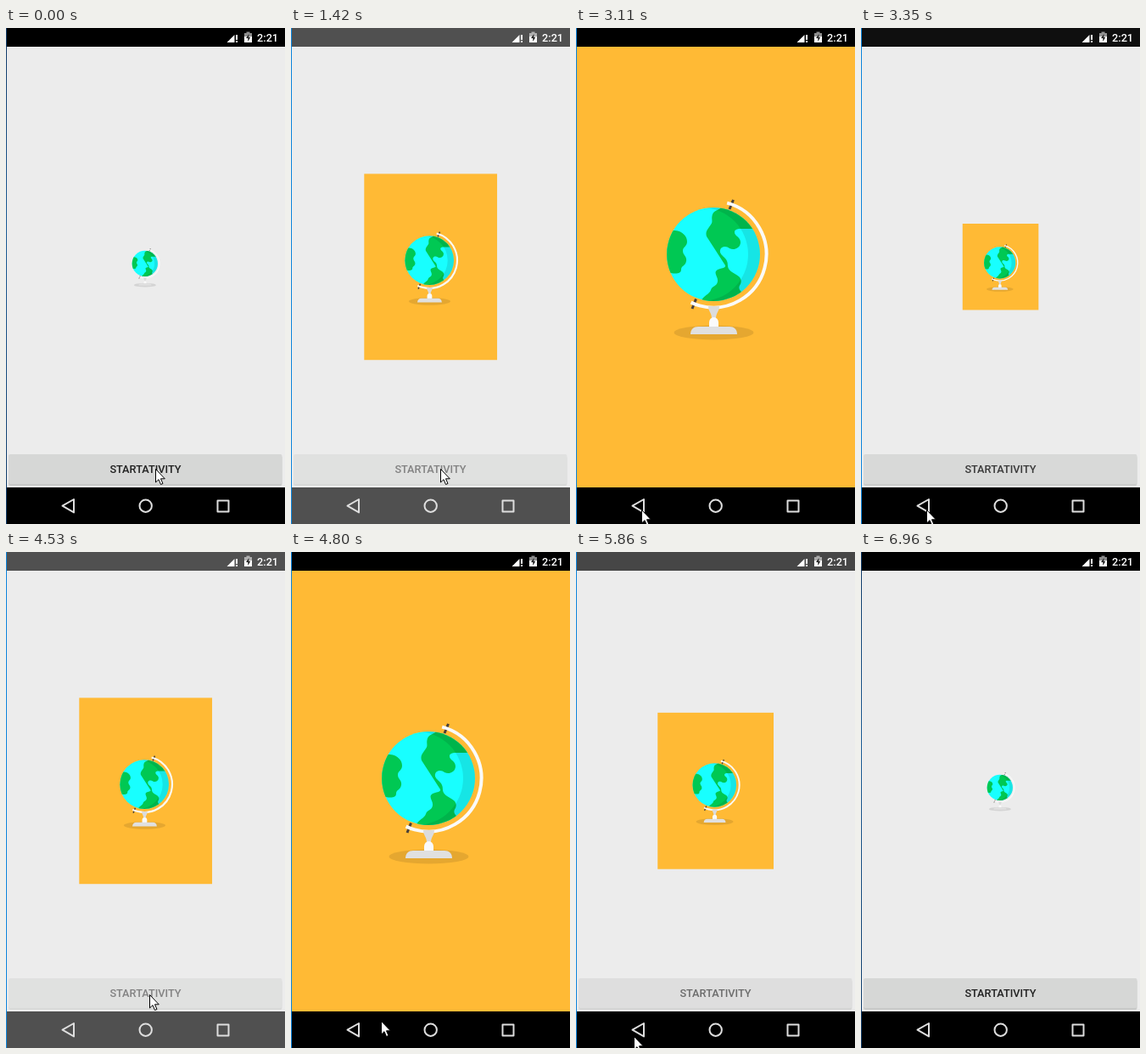
Write an HTML page that moves like this. It is 329 px wide and 583 px high and loops after 7.06 s.

```html
<!DOCTYPE html>
<html lang="en">
<head>
<meta charset="utf-8">
<title>Shared element transition</title>
<style>
  html, body { margin: 0; width: 100%; height: 100%; overflow: hidden; background: #000; }
  svg { display: block; width: 329px; height: 583px; }
  text { font-family: Roboto, sans-serif; font-weight: 500; font-size: 12.75px; }
</style>
</head>
<body>
<svg viewBox="0 0 329 583">
  <defs>
    <linearGradient id="dim" x2="0" y2="1">
      <stop offset="0" stop-color="#123a66"/>
      <stop offset=".4" stop-color="#1b5c96"/>
      <stop offset="1" stop-color="#123a66"/>
    </linearGradient>
    <clipPath id="content"><rect x="1" y="22" width="328" height="518"/></clipPath>
    <clipPath id="navClip"><rect x="1" y="540" width="328" height="43"/></clipPath>
    <clipPath id="ball"><circle cx="162" cy="266" r="55"/></clipPath>
  </defs>

  <rect width="329" height="583"/>
  <rect x="1" y="22" width="328" height="518" fill="#ececec"/>

  <g id="button">
    <rect x="3" y="503" width="322.500" height="35" rx="2" fill="#c9cac9"/>
    <rect x="3" y="501" width="322.500" height="35" rx="2" fill="#d6d7d6"/>
    <rect id="press" x="3" y="501" width="322.500" height="35" rx="2"/>
    <text x="164.500" y="523" text-anchor="middle" fill="#222">STARTATIVITY</text>
  </g>

  <g clip-path="url(#content)">
    <rect id="card" fill="#ffba35"/>
    <g id="globe">
      <ellipse cx="162.500" cy="358" rx="47" ry="8.500" opacity=".1"/>
      <path d="M185.500 202 181 213M141.500 318.500 137 330" stroke="#4a4038" stroke-width="3"/>
      <circle cx="162" cy="266" r="55" fill="#18ffff"/>
      <g clip-path="url(#ball)">
        <g fill="#00c853">
          <path d="M100 238H117C126 239 131 245 131 251C131 257 126 257 126 262C126 267 131 268 130 274C129 280 124 279 124 284C124 289 118 289 112 288H100Z"/>
          <path d="M172 208C171 215 163 213 161 219C159 225 162 227 159 231C156 236 152 239 154 245L176 279C177 282 171 282 167 284C161 288 168 292 167 298C166 304 160 303 159 308C157 314 147 315 147 325H198V312C192 309 191 305 194 301C198 290 184 290 180 283C178 279 180 277 177 272C174 268 169 266 170 261C171 256 178 256 181 259C187 262 194 258 194 252C194 245 187 245 187 240C187 237 190 236 194 236H220V205Z"/>
        </g>
        <path d="M148 211A55 55 0 0 1 148 321H230V211Z" opacity=".1"/>
      </g>
      <circle cx="162" cy="266" r="62.500" fill="none" stroke="#fafafa" stroke-width="4"
        pathLength="360" stroke-dasharray="190 170" transform="rotate(-75 162 266)"/>
      <path d="M156 327H169C169 333 165 335 165 341H160C160 335 156 333 156 327Z" fill="#dcdcdc"/>
      <path d="M157 352V346A5.500 6 0 0 1 168 346V352Z" fill="#fafafa"/>
      <path d="M135 360C135 354 139 351 144 351H181C186 351 190 354 190 360Z" fill="#e0e0e0"/>
    </g>
  </g>

  <rect id="statusVeil" x="1" width="328" height="22" fill="#eee"/>
  <rect id="navVeil" x="1" y="540" width="328" height="43" fill="#eee"/>
  <circle id="ripple" cx="73" cy="562" fill="#fff" clip-path="url(#navClip)"/>

  <g fill="#fff">
    <path d="M260.500 17H269.500V8Z"/>
    <path d="M271 8H273V14H271ZM271 15H273V17H271Z"/>
    <path d="M281 6H283.500V4.500H287.500V6H290V10H281Z" opacity=".55"/>
    <path d="M281 10H290V17H281Z"/>
    <path d="M286.500 7 283 12H285.300V16L288.300 10.800H286.200Z" fill="#222"/>
    <text x="296" y="16">2:21</text>
  </g>
  <g fill="none" stroke="#dedede" stroke-width="2" stroke-linejoin="round">
    <path d="M66.500 561.700 80 554V569.400Z"/>
    <circle cx="164.700" cy="561.700" r="7.200"/>
    <rect x="249.500" y="555.500" width="13" height="13"/>
  </g>

  <rect id="edge" width="1" height="583"/>
  <path id="cursor" d="M.5.5V16L4 12.700 6.500 18.500 9 17.500 6.500 11.800H11.300Z" fill="#fff" stroke="#000"/>
</svg>
<script>
const LOOP = 7060, TICK = 120, PHASE = 100, DURATION = 350;
const OPEN = [1318, 4318], CLOSE = [3111, 5696], BACK = [2700, 5480];

// Pointer path: time, x, y
const PATH = [
  [2040, 176, 518], [2140, 171, 518], [2440, 88, 563], [2610, 77, 566],
  [3470, 77, 566], [4020, 169, 520], [4540, 169, 520], [4900, 74, 567],
  [5100, 68, 569], [5860, 68, 569], [6340, 60, 600]
];

const $ = id => document.getElementById(id);
const set = (id, attrs) => {
  for (const k in attrs) $(id).setAttribute(k, attrs[k]);
};
const clamp = v => Math.min(1, Math.max(0, v));
const mix = (a, b, k) => a + (b - a) * k;

// cubic-bezier(.4, 0, .2, 1), solved by bisection
function ease(x) {
  const bezier = (s, a, b) => 3 * (1 - s) ** 2 * s * a + 3 * (1 - s) * s * s * b + s ** 3;
  let lo = 0, hi = 1;
  for (let i = 0; i < 20; i++) {
    const mid = (lo + hi) / 2;
    if (bezier(mid, .4, .2) < x) lo = mid; else hi = mid;
  }
  return bezier(lo, 0, 1);
}

const run = t => start => ease(clamp((t - start) / DURATION));
const sum = (list, fn) => list.reduce((total, v) => total + fn(v), 0);
const growth = t => sum(OPEN, run(t)) - sum(CLOSE, run(t));

function pointer(t) {
  const i = PATH.findIndex(key => key[0] > t);
  if (i <= 0) return (i ? PATH.at(-1) : PATH[0]).slice(1);
  const [a, b] = [PATH[i - 1], PATH[i]];
  const k = (t - a[0]) / (b[0] - a[0]);
  return [mix(a[1], b[1], k), mix(a[2], b[2], k)];
}

function draw(time) {
  const t = Math.floor((time - PHASE) / TICK) * TICK + PHASE;
  const within = (start, length) => t >= start && t < start + length;
  const raw = growth(t);
  const p = raw < .005 ? 0 : raw;

  const w = mix(67, 328, p), h = mix(62, 518, p);
  const cx = mix(164.5, 165, p), cy = mix(280.7, 281, p);
  set('card', { x: cx - w / 2, y: cy - h / 2, width: w, height: h, opacity: p ? 1 : 0 });
  set('globe', { transform: `translate(164.5 281) scale(${mix(.275, 1, p)}) translate(-164.5 -281)` });

  const veil = 1.5 * p * (1 - p) * clamp(6 * p);
  const opening = OPEN.some(start => within(start, DURATION));
  set('statusVeil', { opacity: veil });
  set('navVeil', { opacity: opening ? veil : 0 });
  set('button', { opacity: clamp(1 - 1.4 * p) });
  set('press', { opacity: OPEN.some(start => within(start - 150, 230)) ? .06 : 0 });

  const tap = BACK.find(start => within(start, DURATION));
  set('ripple', { r: tap ? 40 * clamp((t - tap) / 300) : 0, opacity: .18 });

  set('edge', { fill: time >= 1000 && time < 6960 ? '#0d84dc' : 'url(#dim)' });
  set('cursor', { transform: `translate(${pointer(t).map(Math.round).join(' ')})` });
}

const start = performance.now();
function tick() {
  draw((performance.now() - start) % LOOP);
  requestAnimationFrame(tick);
}
tick();
</script>
</body>
</html>
```
